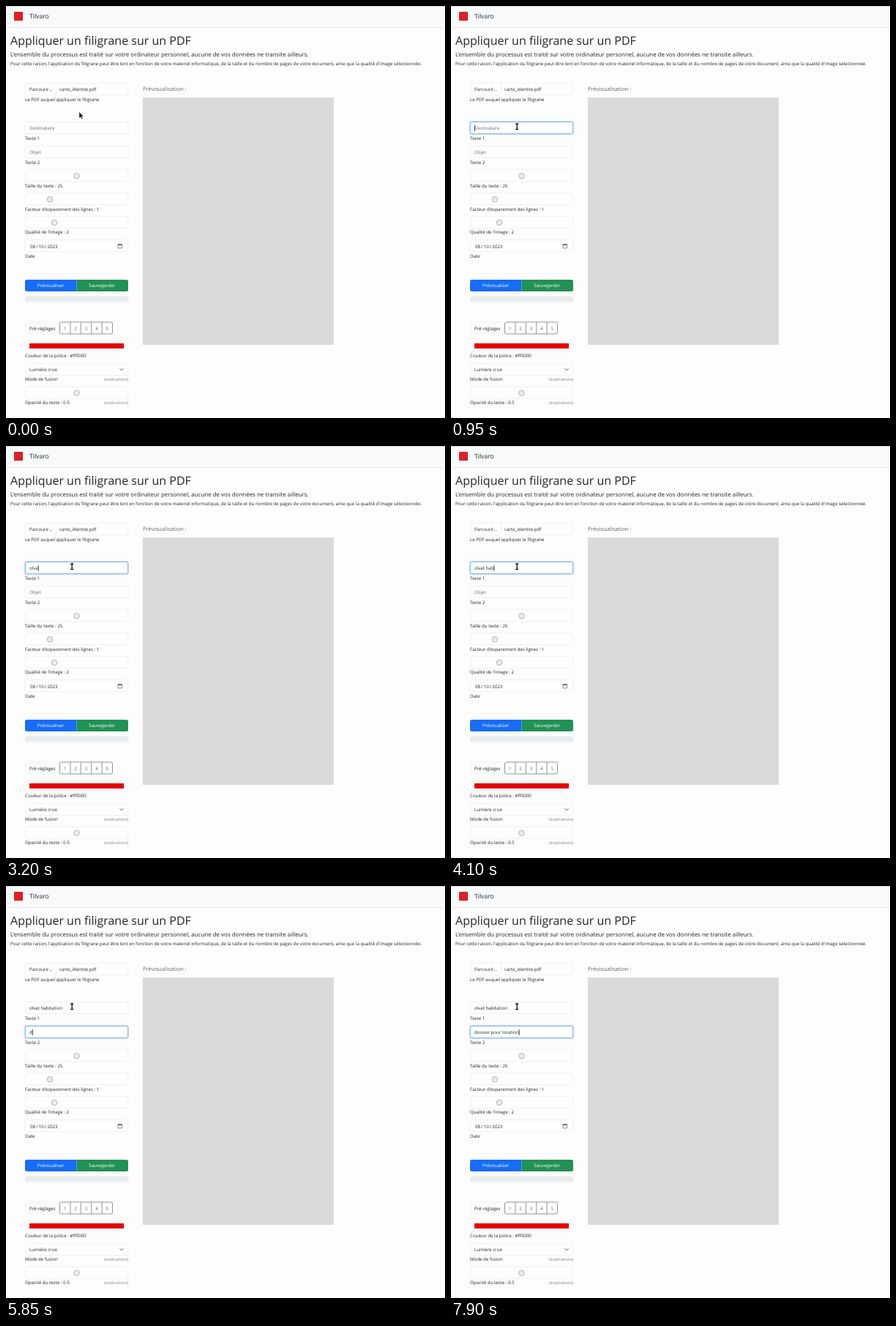
Write an HTML page that moves like this. It is 600 px wide and 563 px high and loops after 8 s.

```html
<!DOCTYPE html>
<html lang="fr">
<head>
<meta charset="utf-8">
<title>Filigrane</title>
<style>
  html, body { margin: 0; width: 100%; height: 100%; overflow: hidden; background: #fdfdfd; }
  svg { display: block; width: 100vw; height: 100vh; }
  text {
    font: 6.17px "Open Sans", "Noto Sans", sans-serif;
    fill: #212529;
    text-rendering: geometricPrecision;
    white-space: pre;
  }
  .muted { fill: #62686e; }
  .white { fill: #fff; }
  .mid { text-anchor: middle; }
  .note { text-anchor: end; fill: #7d8287; }
</style>
</head>
<body>
<svg id="stage" viewBox="0 0 600 563"></svg>
<script>
const stage = document.getElementById('stage');

function add(tag, attrs, content = '') {
  const el = document.createElementNS('http://www.w3.org/2000/svg', tag);
  for (const key in attrs) el.setAttribute(key, attrs[key]);
  el.textContent = content;
  return stage.appendChild(el);
}

const text = (x, y, content, cls = '', size = 6.17) =>
  add('text', { x, y, class: cls, style: `font-size:${size}px` }, content);
const rect = (x, y, width, height, fill, more = {}) =>
  add('rect', { x, y, width, height, fill, ...more });
const path = (d, stroke, more = {}) =>
  add('path', { d, stroke, fill: 'none', ...more });
const box = y => rect(26.5, y, 140, 16, '#fefefe', { rx: 2, stroke: '#eff0f1' });

function slider(y, thumb) {
  box(Math.round(y) - 8.5);
  add('circle', { cx: thumb, cy: y, r: 3.8, fill: '#eaeaea', stroke: '#a6a6a6', 'stroke-width': .8 });
}

// Header and introduction
rect(0, 0, 600, 29, '#f8f9fb');
rect(0, 0, 600, 1, '#dcdcde');
rect(0, 29, 600, 1, '#e9eaec');
rect(11, 8, 12, 12, '#dd2028');
text(32, 17, 'Tilvaro', '', 8.6);
text(6, 53.4, 'Appliquer un filigrane sur un PDF', '', 16);
text(6, 68.8, "L'ensemble du processus est traité sur votre ordinateur personnel, aucune de vos données ne transite ailleurs.", '', 7.96);
text(6, 80.6, "Pour cette raison, l'application du filigrane peut être lent en fonction de votre materiel informatique, de la taille et du nombre de pages de votre document, ainsi que la qualité d'image sélectionnée.");

// Preview
text(187, 115.6, 'Prévisualisation :', 'muted', 7.65);
rect(187, 125, 261, 338, '#dbdadb');

// Form
box(105.5);
path('M68.5 106V121', '#e8e9eb', { 'stroke-width': .8 });
text(32, 116.3, 'Parcourir...');
text(73, 116.3, 'carte_identite.pdf');

slider(232.3, 96.5);
slider(264.3, 60);
slider(296, 66);
box(319.5);
text(33, 330.6, '08\u2009/\u200910\u2009/\u20092023');
rect(153, 325.5, 5.5, 5.5, 'none', { rx: .7, stroke: '#444', 'stroke-width': .6 });
path('M153 326.2H158.5', '#333', { 'stroke-width': 1 });

const labels = [
  [129.6, 'Le PDF auquel appliquer le filigrane'], [182.8, 'Texte 1'], [215.7, 'Texte 2'],
  [247.6, 'Taille du texte : 25'], [279.5, "Facteur d'espacement des lignes : 1"],
  [311.2, "Qualité de l'image : 2"], [344.3, 'Date'], [479.5, 'Couleur de la police : #ff0000'],
  [512.4, 'Mode de fusion'], [543.9, 'Opacité du texte : 0.5']
];
for (const [y, label] of labels) text(26, y, label);

path('M96.5 374H28.5Q26 374 26 376.5V387.5Q26 390 28.5 390H96.5Z', 'none', { style: 'fill:#176df6' });
path('M96.5 374H164.5Q167 374 167 376.5V387.5Q167 390 164.5 390H96.5Z', 'none', { style: 'fill:#219256' });
text(61, 384.2, 'Prévisualiser', 'mid white');
text(131.3, 384.2, 'Sauvegarder', 'mid white');
rect(26, 396.5, 141.5, 8, '#e9ecef', { rx: 2.5 });

// Presets
rect(26.5, 432, 47, 16, '#fbfbfc', { rx: 2, stroke: '#f0f0f2', 'stroke-width': .8 });
text(32, 442.5, 'Pré-réglages');
rect(73.5, 432, 72, 16, '#fefefe', { rx: 2, stroke: '#747b82', 'stroke-width': .8 });
for (let i = 0; i < 5; i++) {
  const x = 73.5 + i * 14.4;
  if (i) path(`M${x} 432V448`, '#747b82', { 'stroke-width': .8 });
  text(x + 7.2, 442.5, i + 1, 'mid muted');
}

// Colour, blending and opacity
rect(26.5, 456.5, 140, 16, 'none', { rx: 2, stroke: '#f4f4f5' });
rect(32, 461, 129, 7, '#e60000');
box(488.5);
text(32, 498.9, 'Lumière crue');
path('M155.6 495.4L158 497.8L160.4 495.4', '#343a40', { 'stroke-width': .9 });
slider(529, 96.5);
for (const y of [512, 543.5]) text(167.5, y, '(explications)', 'note', 5.5);

function field(y, placeholder) {
  box(y);
  const ring = rect(26.5, y, 140, 16, 'none', { rx: 2, stroke: '#c4dbff', 'stroke-width': 3 });
  const edge = rect(26.5, y, 140, 16, '#fff', { rx: 2, stroke: '#86b7fe' });
  const label = text(32, y + 10.8, placeholder);
  const caret = rect(32, y + 4.5, .8, 8, '#111');
  return { placeholder, ring, edge, label, caret };
}

const recipient = field(158.5, 'Destinataire');
const subject = field(191.5, 'Objet');

const arrow = path('M0 0V8.6L2 6.8L3.3 9.8L4.8 9.2L3.5 6.3H6.1Z', '#fff', { style: 'fill:#111', 'stroke-width': .4 });
const beam = path('M-2 -3.8H-.5L0 -3.4L.5 -3.8H2M0 -3.4V3.4M-2 3.8H-.5L0 3.4L.5 3.8H2', '#111', { 'stroke-width': 1.4 });

const LOOP = 8000, BLINK = 530, FADE = 150, CLICK = 570, TAB = 5120;
const clamp = v => Math.min(1, Math.max(0, v));

const words = [
  { value: 'olvat habitation',
    keys: [2750, 2900, 3050, 3200, 3400, 3700, 3800, 3950, 4100, 4250, 4450, 4650, 4850, 4880, 4900, 4950] },
  { value: 'dossier pour location',
    keys: Array.from({ length: 21 }, (_, i) => i < 13 ? 5850 + i * 104 : 7250 + (i - 13) * 90) }
];

function drawField(f, word, t, from, to) {
  const count = word.keys.filter(k => k <= t).length;
  const glow = clamp((t - from) / FADE) * (1 - clamp((t - to) / FADE));
  const lastKey = count ? word.keys[count - 1] : from;
  const caretOn = t >= from && t < to && Math.floor((t - lastKey) / BLINK) % 2 === 0;

  f.ring.setAttribute('opacity', glow);
  f.edge.setAttribute('opacity', glow);
  f.label.textContent = count ? word.value.slice(0, count) : f.placeholder;
  f.label.setAttribute('class', count ? '' : 'muted');
  f.caret.setAttribute('x', 32 + (count ? f.label.getComputedTextLength() : 0));
  f.caret.setAttribute('opacity', caretOn ? 1 : 0);
}

function drawPointer(t) {
  const p = clamp((t - 50) / 450), e = p * p * (3 - 2 * p);
  const x = 100 - 9.8 * e, y = 144.8 + 20 * e, over = y >= 159;
  for (const [shape, shown] of [[arrow, !over], [beam, over]]) {
    shape.setAttribute('transform', `translate(${x} ${y})`);
    shape.setAttribute('opacity', shown ? 1 : 0);
  }
}

function frame(now) {
  const t = now % LOOP;
  drawField(recipient, words[0], t, CLICK, TAB);
  drawField(subject, words[1], t, TAB, LOOP * 2);
  drawPointer(t);
  requestAnimationFrame(frame);
}
requestAnimationFrame(frame);
</script>
</body>
</html>
```
